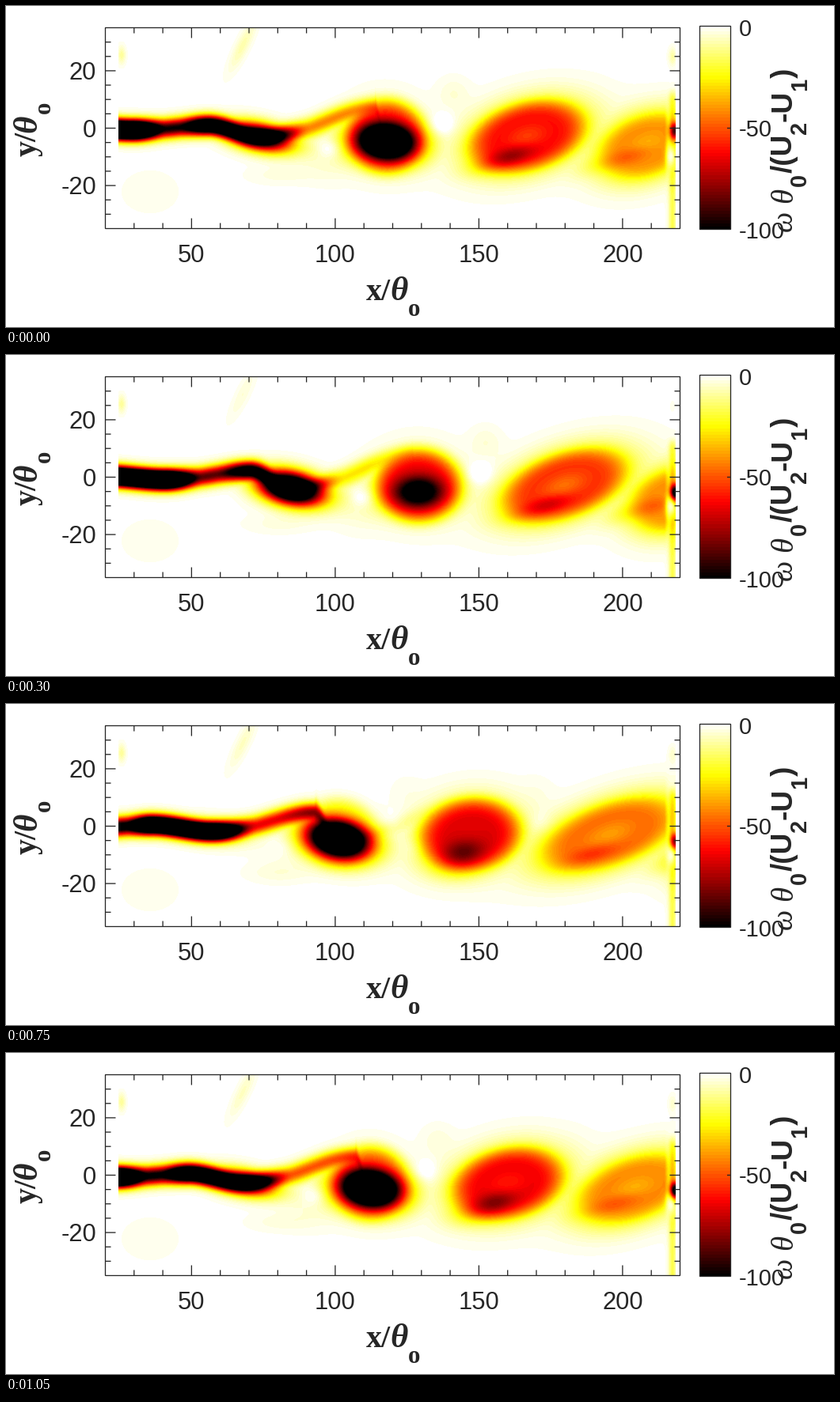
Write a matplotlib script that moves like this. It is 1046x406 px and loops after 1200 ms.

```python
import numpy as np
import matplotlib.pyplot as plt
from matplotlib.animation import FuncAnimation

W, H, DPI = 1046, 406, 64
FRAMES, INTERVAL = 8, 150
PT = 72 / DPI
INK = "#262626"
LEFT, RIGHT, TOP, BOTTOM = 142, 846, 28, 281

gx, gy = np.meshgrid(np.arange(LEFT, RIGHT) + .5, np.arange(TOP, BOTTOM) + .5)


def ramp(t, t0, t1):
    """Ease from 0 at t0 to 1 at t1."""
    u = np.clip((t - t0) / (t1 - t0), 0, 1)
    return u * u * (3 - 2 * u)


def bell(t, mid, width):
    return np.exp(-((t - mid) / width) ** 2)


def radius(cx, cy, a, b, tilt=0):
    """Elliptic distance from a centre, 1 on the ellipse."""
    t = np.radians(tilt)
    dx, dy = gx - cx, gy - cy
    u = dx * np.cos(t) + dy * np.sin(t)
    v = dy * np.cos(t) - dx * np.sin(t)
    return np.hypot(u / a, v / b)


def blob(cx, cy, a, b, tilt=0):
    return np.exp(-radius(cx, cy, a, b, tilt) ** 2)


class Vortex:
    """One roller; age counts frames since roll-up."""

    def __init__(self, age):
        self.age = age
        self.x = 320 + 20 * age + 26 * bell(age, 19, 5)
        self.y = 157 + 14 * ramp(age, -8, 6)
        # shear layer strength at the lobe, in the braid behind, at the crest
        self.lobe = 2.3 * (1 - ramp(age, -8, 12))
        self.braid = 1.15 * (1 - ramp(age, -13, 9))
        self.crest = 2.2 * (1 - ramp(age, -8, 14))
        self.crest_x = self.x - 77 + 70 * ramp(age, -4, 11)
        self.crest_y = 153 - 28 * ramp(age, -2, 11)

    def core(self):
        t = self.age
        level = (1.9 * ramp(t, -6, 4) - 1.2 * ramp(t, 7, 12)
                 - .35 * ramp(t, 12, 24))
        return level * blob(self.x - 22 * ramp(t, 10, 17),
                            self.y + 19 * ramp(t, 9, 14),
                            40 + 12 * ramp(t, 12, 20),
                            15 + 11 * ramp(t, -2, 7) - 10 * ramp(t, 12, 17),
                            12 * ramp(t, -6, 0) - 27 * ramp(t, 4, 16))

    def shape(self):
        t = self.age
        return radius(self.x, 165 + 18 * ramp(t, 21, 26),
                      42 + 42 * ramp(t, 6, 24) - 33 * ramp(t, 21, 25),
                      28 + 12 * ramp(t, 0, 7) - 5 * ramp(t, 12, 20),
                      8 - 28 * ramp(t, 6, 19))

    def body(self, q):
        t = self.age
        level = .65 * ramp(t, 1, 9) - .28 * ramp(t, 13, 25)
        hollow = .25 * ramp(t, 12, 18)
        return level * np.exp(-.45 * q ** 5) * (1 - hollow * bell(q, 0, .45))

    def halo(self):
        return .07 * ramp(self.age, 4, 9) + .15 * ramp(self.age, 9, 16)

    def surroundings(self):
        """Pale fluid with clear gaps around a mature roller."""
        gap = 70 + 4 * max(0, self.age - 8)
        return bell(self.age, 9, 4) * (.05 * blob(self.x - 75, 190, 35, 30)
                                       + .04 * blob(self.x + 85, 110, 20, 20)
                                       - .1 * blob(self.x - 70, 180, 14, 12)
                                       - .1 * blob(self.x + gap, 150, 15, 13))


def shear_layer(train):
    """Ribbon running through every lobe and over the next crest."""
    u = np.linspace(0, 1, 30)
    down = ramp(u, 0, 1)
    path = []
    for v, nxt in zip(train, train[1:]):
        path.append((v.x + (nxt.crest_x - v.x) * u,
                     v.y + (nxt.crest_y - v.y) * down ** 1.3,
                     v.lobe + (v.braid - v.lobe) * ramp(u, 0, .45)
                     + (nxt.crest - v.braid) * ramp(u, .6, 1)))
        path.append((nxt.crest_x + (nxt.x - nxt.crest_x) * u,
                     nxt.crest_y + (nxt.y - nxt.crest_y) * down,
                     nxt.crest + (nxt.lobe - nxt.crest) * down))
    xs, ys, levels = np.hstack(path)
    x = gx[0]
    mid = np.interp(x, xs, ys)
    slope = np.clip(np.gradient(mid, x), -.6, .6)
    dist = (gy - mid) / np.sqrt(1 + slope ** 2)
    return np.interp(x, xs, levels) * bell(dist, 0, 12)


def field(k):
    train = [Vortex(k + 8 * n) for n in range(-2, 4)]
    total = shear_layer(train) ** 3
    pale = np.zeros_like(gx)
    for v in train:
        q = v.shape()
        halo = v.halo() * np.exp(-(q / 1.4) ** 4)
        total += v.core() ** 3 + v.body(q) ** 3 + halo ** 3
        pale += .15 * v.halo() * np.exp(-(q / 1.9) ** 4) + v.surroundings()
    w = np.cbrt(total)

    # faint background patches
    pulse = np.cos(np.pi * k / 2)
    pale += (.06 + .02 * pulse) * blob(299, 50, 34, 8, -64)
    pale += .1 * blob(146, 62, 5, 11)
    pale += .018 * blob(182, 235, 40, 30) + .03 * blob(345, 214, 40, 12)

    # outflow edge
    w *= 1 - .6 * ramp(gx, 831, 839)
    strip = bell(gx, 842, 5)
    w += strip * (.17 * ramp(gy, 100, 120) + (.05 + .04 * pulse) * bell(gy, 64, 11))
    w = np.maximum(w + pale, 0)
    w *= 1 - .9 * blob(840, 190, 6, 15)
    spot = .5 + .4 * np.cos(.8 * np.pi * (k - 2))
    return w + spot * blob(846, 158 + 16 * ramp(k, .5, 2), 7, 10)


def heat(w):
    """White to yellow, red and black in 64 steps."""
    u = 1 - np.round(np.clip(w, 0, 1) * 63) / 63
    rgb = np.stack([u * 8 / 3, u * 8 / 3 - 1, u * 4 - 3], axis=-1)
    return np.clip(rgb, 0, 1)


fig = plt.figure(figsize=(W / DPI, H / DPI), dpi=DPI, facecolor="white")
ax = fig.add_axes([0, 0, 1, 1])


def line(xs, ys, width=1.3):
    ax.plot(xs, ys, color=INK, lw=width * PT, solid_capstyle="butt",
            solid_joinstyle="miter", snap=False, zorder=3)


def box(x0, y0, x1, y1):
    line([x0, x1, x1, x0, x0], [y0, y0, y1, y1, y0])


def label(x, y, text, size, font="Liberation Sans", **kw):
    ax.text(x, y, text, fontsize=size * PT, family=font, color=INK,
            va="baseline", rotation_mode="anchor", zorder=4, **kw)


def picture(rgb, x0, x1, y0, y1):
    return ax.imshow(rgb, extent=(x0, x1, y1, y0), aspect="auto",
                     interpolation="nearest", zorder=1)


X0, X1, Y0, Y1 = 125.5, 851.5, 27.5, 281.5
frames = [heat(field(k)) for k in range(FRAMES)]
image = picture(frames[0], LEFT, RIGHT, TOP, BOTTOM)
bar = np.linspace(0, 1, 257)[:, None].repeat(39, axis=1)
picture(heat(bar), 876, 915, 25, 282)
ax.set_xlim(0, W)
ax.set_ylim(H, 0)
ax.axis("off")

# plot frame and ticks
box(X0, Y0, X1, Y1)
for v in range(30, 220, 10):
    x = X0 + (v - 20) * 3.63
    major = v % 50 == 0
    n = 13 if major else 7
    line([x, x], [Y0, Y0 + n])
    line([x, x], [Y1, Y1 - n])
    if major:
        label(x, 324.5, str(v), 31, ha="center")
for v in range(-30, 35, 5):
    y = 154.5 - v * 3.629
    major = v % 20 == 0
    n = 13 if major else 7
    line([X0, X0 + n], [y, y])
    line([X1, X1 - n], [y, y])
    if major:
        label(114, y + 11, str(v), 31, ha="right")

# colour scale
box(876.5, 25.5, 915.5, 282.5)
line([911, 915], [154.5, 154.5])
for v, y in ((0, 38), (-50, 165), (-100, 294)):
    label(926, y, str(v), 29)

# axis names
SERIF = "Liberation Serif"
GREEK = dict(font=SERIF, style="italic")
for x, y, sub_x, sub_y, name, turn in ((455, 372, 508, 392, "x/", 0),
                                       (38, 190, 56, 136, "y/", 90)):
    step = np.array([30, 0]) if turn == 0 else np.array([0, -30])
    label(x, y, name, 40, SERIF, weight="bold", rotation=turn)
    label(*(step + (x, y)), "θ", 43, weight="bold", rotation=turn, **GREEK)
    label(sub_x, sub_y, "o", 31, SERIF, weight="bold", rotation=turn)

label(993, 285, "ω", 37, rotation=90, **GREEK)
label(993, 249, "θ", 39, rotation=90, **GREEK)
for x, y, text, size in ((1011, 228, "0", 29), (993, 211, "/(U", 37),
                         (1011, 162, "2", 29), (993, 146, "-U", 37),
                         (1011, 107, "1", 29), (993, 91, ")", 37)):
    label(x, y, text, size, weight="bold", rotation=90)


def update(k):
    image.set_data(frames[k])
    return [image]


anim = FuncAnimation(fig, update, frames=FRAMES, interval=INTERVAL,
                     repeat=True, repeat_delay=0, blit=False)
plt.show()
```
